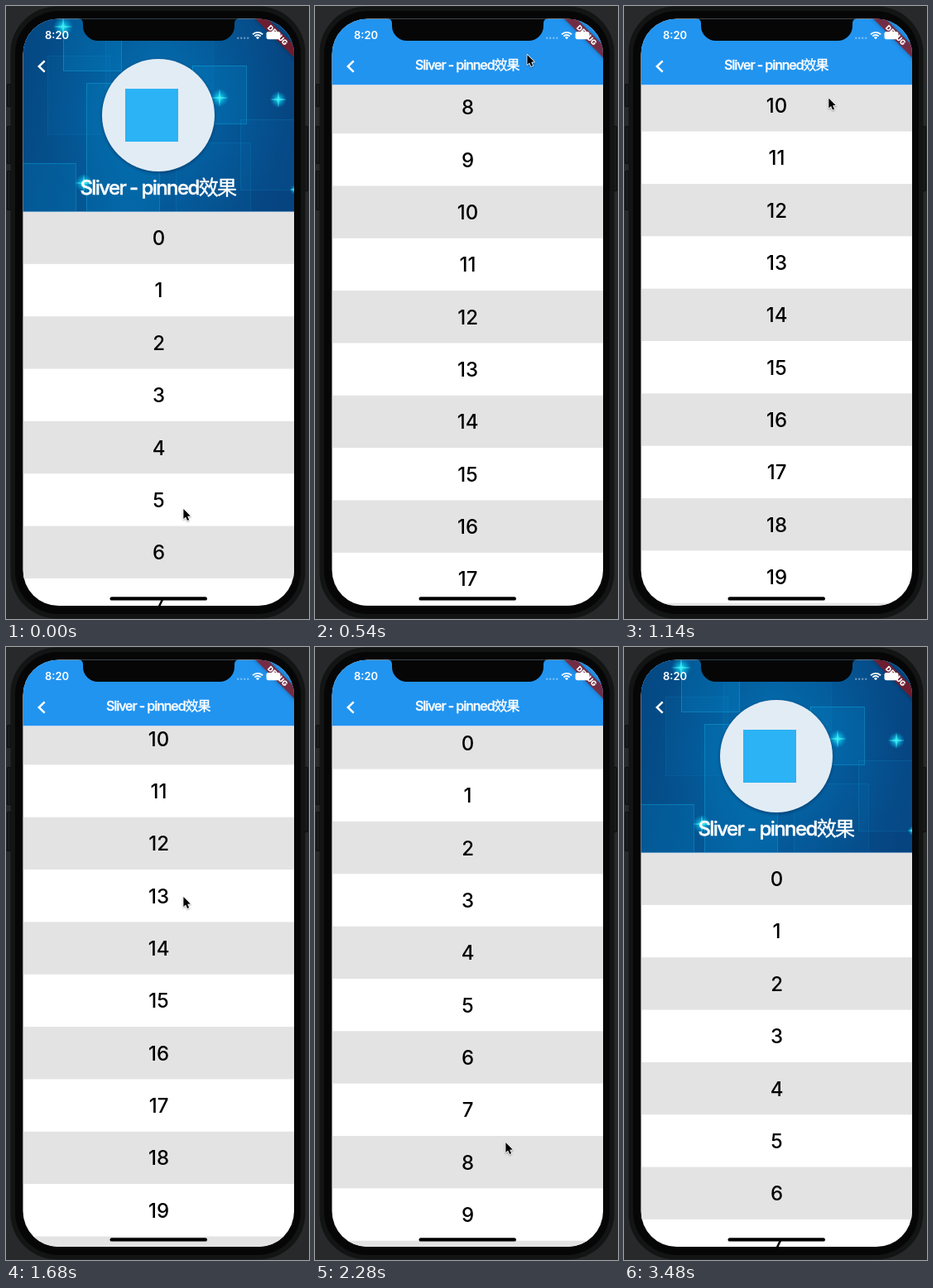
Recreate the animation shown at these times as an HTML page with a canvas. Size 366 by 741 pixels, loop 3.54 s.

```html
<!DOCTYPE html>
<html lang="zh-CN">
<head>
<meta charset="utf-8">
<title>Pinned header</title>
<style>
html, body { margin: 0; width: 100%; height: 100%; overflow: hidden; background: #27292a; }
canvas { display: block; width: 366px; height: 741px; }
</style>
</head>
<body>
<canvas id="stage"></canvas>
<script>
const W = 366, H = 741, LOOP = 3540, STEP = 60;
const SCREEN = { x: 20.5, y: 15.5, w: 327.5, h: 709.5, r: 43 };
const CX = SCREEN.x + SCREEN.w / 2;
const FULL = 233, PINNED = 80, RANGE = FULL - PINNED, ROW = 63.35;
const FONT = 'Inter, "Noto Sans CJK SC", "Noto Sans CJK", sans-serif';

const canvas = document.getElementById('stage');
const ctx = canvas.getContext('2d');
const dpr = window.devicePixelRatio || 1;
canvas.width = W * dpr;
canvas.height = H * dpr;

const clamp = (v, lo = 0, hi = 1) => Math.min(hi, Math.max(lo, v));
const lerp = (a, b, p) => a + (b - a) * p;
const smooth = p => p * p * (3 - 2 * p);

// Cubic through two values with given slopes per ms
function hermite(t, t0, t1, a, b, ma, mb) {
  const d = t1 - t0, p = (t - t0) / d, q = p * p, c = q * p;
  return (2 * c - 3 * q + 1) * a + (c - 2 * q + p) * d * ma
       + (3 * q - 2 * c) * b + (c - q) * d * mb;
}

const fling = (t, t0, from, reach) =>
  from + reach * (1 - Math.exp(-0.00435 * (t - t0)));

// Drag up, fling, drag down, fling, small bounce at the top
function scrollAt(t) {
  if (t < 360) return hermite(t, 0, 360, 0, 499, 0.3, 1.33);
  if (t < 1740) return fling(t, 360, 499, 305);
  if (t < 2040) return hermite(t, 1740, 2040, 803, 520, 0, -2.2);
  if (t < 2716) return fling(t, 2040, 520, -549);
  const s = t - 2716;
  return -0.214 * s * Math.exp(-s / 60);
}

// time, x, y, ease (0 linear, 1 smooth)
const POINTER = [
  [0, 214, 607, 0], [360, 241, 67, 0], [480, 256, 58, 1], [960, 256, 58, 1],
  [1560, 214, 301, 1], [1740, 214, 301, 1], [2060, 230, 598, 1],
  [2940, 230, 598, 1], [3360, 208, 760, 1], [LOOP, 208, 760, 1]
];

function pointerAt(t) {
  const i = POINTER.findIndex(k => k[0] > t);
  const a = POINTER[i - 1], b = POINTER[i];
  let p = (t - a[0]) / (b[0] - a[0]);
  if (b[3]) p = smooth(p);
  return [lerp(a[1], b[1], p), lerp(a[2], b[2], p)];
}

function box(x, y, w, h, r, fill) {
  ctx.beginPath();
  ctx.roundRect(x, y, w, h, r);
  ctx.fillStyle = fill;
  ctx.fill();
}

function text(str, x, y, size, weight, color, align = 'center') {
  ctx.font = `${weight} ${size}px ${FONT}`;
  ctx.textAlign = align;
  ctx.fillStyle = color;
  ctx.fillText(str, x, y);
}

function trace(points) {
  ctx.beginPath();
  points.forEach(([x, y]) => ctx.lineTo(x, y));
}

function drawPhone() {
  ctx.fillStyle = '#27292a';
  ctx.fillRect(0, 0, W, H);
  for (const [x, y, h] of [[1, 94, 28], [1, 145, 46], [1, 199, 48], [360, 145, 79]]) {
    box(x, y, 5, h, 1.5, '#0c0d0d');
    box(x + 1, y + 1, 3, h - 2, 1, '#191a1b');
  }
  box(5.5, 0.5, 356, 740, 56, '#131414');
  box(11, 6, 345, 729, 52, '#060606');
}

function drawSpark(x, y, r) {
  const g = ctx.createRadialGradient(x, y, 0, x, y, r);
  g.addColorStop(0, 'rgba(130,255,255,1)');
  g.addColorStop(0.25, 'rgba(20,225,245,.75)');
  g.addColorStop(1, 'rgba(0,170,230,0)');
  ctx.fillStyle = g;
  ctx.fillRect(x - r, y - r, 2 * r, 2 * r);
  const s = 1.3;
  trace([[x, y - r], [x + s, y - s], [x + r, y], [x + s, y + s],
         [x, y + r], [x - s, y + s], [x - r, y], [x - s, y - s]]);
  ctx.fillStyle = 'rgba(60,235,245,.75)';
  ctx.fill();
}

function drawCover(top) {
  ctx.save();
  ctx.translate(0, top - SCREEN.y);
  let g = ctx.createLinearGradient(20, 90, 348, 150);
  g.addColorStop(0, '#044984');
  g.addColorStop(0.45, '#055c9b');
  g.addColorStop(1, '#064480');
  ctx.fillStyle = g;
  ctx.fillRect(20, 15, 329, 234);
  g = ctx.createRadialGradient(190, 125, 20, 190, 125, 150);
  g.addColorStop(0, 'rgba(0,130,200,.4)');
  g.addColorStop(1, 'rgba(0,110,180,0)');
  ctx.fillStyle = g;
  ctx.fillRect(20, 15, 329, 234);

  ctx.lineWidth = 1;
  for (const [x, y, w, h, a] of [
    [69, 5, 70, 73, 0.4], [97, 93, 88, 170, 0.35], [225, 72, 65, 70, 0.4],
    [10, 190, 74, 70, 0.35], [283, 137, 80, 85, 0.14], [50, 60, 75, 95, 0.1],
    [205, 165, 90, 100, 0.12], [120, 30, 130, 70, 0.1]
  ]) {
    ctx.fillStyle = `rgba(0,150,215,${a * 0.45})`;
    ctx.strokeStyle = `rgba(20,180,230,${a})`;
    ctx.fillRect(x, y, w, h);
    ctx.strokeRect(x + 0.5, y + 0.5, w, h);
  }
  for (const [x, y, r] of [[69, 25, 12], [258, 111, 11], [329, 113, 10], [94, 214, 11], [349, 222, 6]])
    drawSpark(x, y, r);

  ctx.save();
  ctx.shadowColor = 'rgba(0,30,70,.55)';
  ctx.shadowBlur = 4 * dpr;
  ctx.shadowOffsetY = 1.5 * dpr;
  box(116, 64, 136, 136, 68, '#e2ecf5');
  ctx.restore();
  box(144, 100, 64, 64, 0, '#2bb3f5');
  ctx.restore();
}

function drawTitle(bottom, p) {
  const label = 'Sliver - pinned效果', spacing = -1.05;
  const k = lerp(1.5, 1, p);
  ctx.save();
  ctx.translate(CX, bottom - 14);
  ctx.scale(k, k);
  ctx.letterSpacing = spacing + 'px';
  text(label, spacing / 2, -4.6, 16, 500, '#fff');
  // Thin outline brings the CJK glyphs to medium weight
  ctx.strokeStyle = '#fff';
  ctx.lineWidth = 0.3;
  ctx.lineJoin = 'round';
  ctx.strokeText(label, spacing / 2, -4.6);
  ctx.restore();
}

function drawHeader(scroll) {
  const p = clamp(scroll / RANGE);
  const h = FULL - RANGE * p;
  const fadeStart = 1 - 49 / RANGE;

  ctx.save();
  ctx.beginPath();
  ctx.rect(SCREEN.x, SCREEN.y, SCREEN.w, h);
  ctx.clip();
  ctx.fillStyle = '#2194f0';
  ctx.fillRect(SCREEN.x, SCREEN.y, SCREEN.w, h);
  ctx.globalAlpha = 1 - clamp((p - fadeStart) / (1 - fadeStart));
  if (ctx.globalAlpha > 0) drawCover(SCREEN.y - RANGE / 4 * p);
  ctx.restore();

  drawTitle(SCREEN.y + h, p);

  trace([[46.7, 66.3], [39.8, 73], [46.7, 79.7]]);
  ctx.strokeStyle = '#fff';
  ctx.lineWidth = 2.5;
  ctx.stroke();
}

function drawRows(scroll) {
  const edge = SCREEN.y + FULL - RANGE * clamp(scroll / RANGE);
  ctx.save();
  ctx.beginPath();
  ctx.rect(SCREEN.x, edge, SCREEN.w, H);
  ctx.clip();
  for (let i = 0; i < 30; i++) {
    const y = SCREEN.y + FULL + i * ROW - scroll;
    if (y + ROW < edge || y > H) continue;
    if (i % 2 === 0) {
      ctx.fillStyle = '#e3e3e3';
      ctx.fillRect(SCREEN.x, y, SCREEN.w, ROW);
    }
    text(String(i), CX + 0.3, y + 40.6, 24, 500, '#000');
  }
  ctx.restore();
}

function drawStatus() {
  text('8:20', 47, 40, 13, 600, '#fff', 'left');
  for (let i = 0; i < 4; i++) box(279 + i * 4, 37.5, 2.4, 2.4, 1.2, 'rgba(255,255,255,.4)');
  ctx.strokeStyle = '#fff';
  ctx.lineWidth = 1.8;
  for (const r of [8.2, 5]) {
    ctx.beginPath();
    ctx.arc(304, 40, r, -Math.PI * 0.76, -Math.PI * 0.24);
    ctx.stroke();
  }
  ctx.beginPath();
  ctx.moveTo(304, 40.2);
  ctx.arc(304, 40, 2.8, -Math.PI * 0.76, -Math.PI * 0.24);
  ctx.fillStyle = '#fff';
  ctx.fill();
  box(314.5, 31, 17, 9.2, 2.6, '#fff');
  box(332.3, 34, 1.3, 3.2, 0.6, 'rgba(255,255,255,.6)');
}

function drawRibbon() {
  ctx.save();
  ctx.translate(SCREEN.x + SCREEN.w, SCREEN.y);
  ctx.rotate(Math.PI / 4);
  ctx.shadowColor = 'rgba(0,0,0,.45)';
  ctx.shadowBlur = 5 * dpr;
  box(-40, 22.6, 80, 10.5, 0, 'rgba(150,22,30,.72)');
  ctx.shadowColor = 'transparent';
  text('DEBUG', 0, 31.1, 8.7, 900, '#fff');
  ctx.restore();
}

function drawNotch() {
  ctx.beginPath();
  ctx.moveTo(87, 15);
  ctx.quadraticCurveTo(93, 15.5, 93, 21);
  ctx.lineTo(93, 24);
  ctx.arcTo(93, 42, 111, 42, 18);
  ctx.lineTo(258, 42);
  ctx.arcTo(276, 42, 276, 24, 18);
  ctx.lineTo(276, 21);
  ctx.quadraticCurveTo(276, 15.5, 282, 15);
  ctx.fillStyle = '#060606';
  ctx.fill();
}

function drawPointer([x, y]) {
  ctx.save();
  ctx.translate(x + 0.4, y + 1);
  ctx.scale(0.84, 0.84);
  trace([[0, 0], [0, 14.2], [3.2, 11.2], [5.6, 16.6], [8, 15.5], [5.7, 10.4], [10, 10.2]]);
  ctx.closePath();
  ctx.shadowColor = 'rgba(0,0,0,.35)';
  ctx.shadowBlur = 2 * dpr;
  ctx.shadowOffsetY = dpr;
  ctx.lineJoin = 'round';
  ctx.lineWidth = 2;
  ctx.strokeStyle = '#fff';
  ctx.stroke();
  ctx.shadowColor = 'transparent';
  ctx.fillStyle = '#000';
  ctx.fill();
  ctx.restore();
}

function draw(t) {
  const scroll = scrollAt(t);
  ctx.setTransform(dpr, 0, 0, dpr, 0, 0);
  drawPhone();
  ctx.save();
  ctx.beginPath();
  ctx.roundRect(SCREEN.x, SCREEN.y, SCREEN.w, SCREEN.h, SCREEN.r);
  ctx.clip();
  ctx.fillStyle = '#fff';
  ctx.fillRect(0, 0, W, H);
  drawRows(scroll);
  drawHeader(scroll);
  drawRibbon();
  drawStatus();
  drawNotch();
  box(125.5, 714.2, 117.5, 4.4, 2.2, '#000');
  ctx.restore();
  drawPointer(pointerAt(t));
}

const start = performance.now();
function tick() {
  const t = (performance.now() - start) % LOOP;
  draw(Math.floor(t / STEP) * STEP);
  requestAnimationFrame(tick);
}
tick();
</script>
</body>
</html>
```
